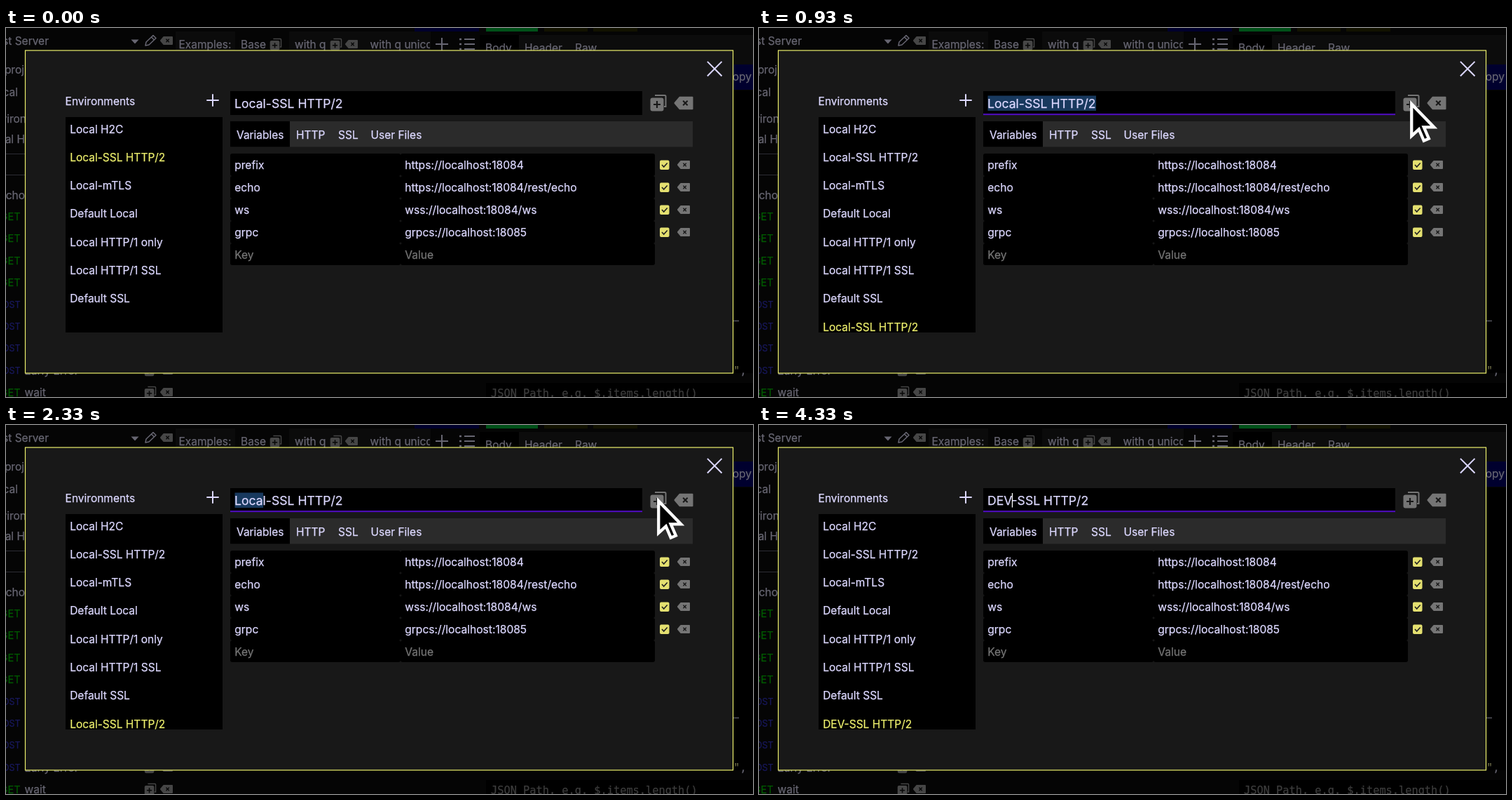
These frames come from a looping animation (1066x526 px, 4390 ms). An HTML page:

```html
<!DOCTYPE html>
<html lang="en">
<head>
<meta charset="utf-8">
<title>Copy environment</title>
<style>
  html, body { margin: 0; width: 100%; height: 100%; overflow: hidden; background: #050505; }
  svg { display: block; width: 1066px; height: 526px; font-family: Inter, "Noto Sans", sans-serif; }
</style>
</head>
<body>
<svg id="stage" viewBox="0 0 1066 526"></svg>
<script>
const LOOP = 4390;
const INK = '#dcd8ff', YELLOW = '#ecee6c', DIM = '#676672', GRAY = '#757575', PANEL = '#181818';
const ICON = '#464646';
const stage = document.getElementById('stage');

// y is the middle of the capitals; the fine stroke gives the slightly heavy rendering
const text = (x, y, s, fill = INK, size = 15.5, attrs = '') =>
  `<text x="${x}" y="${y + size * 0.364}" font-size="${size}" fill="${fill}" stroke="${fill}" stroke-width=".25" ${attrs}>${s}</text>`;
const rect = (x, y, w, h, fill, attrs = '') =>
  `<rect x="${x}" y="${y}" width="${w}" height="${h}" fill="${fill}" ${attrs}/>`;
const line = (d, stroke, width, attrs = '') =>
  `<path d="${d}" fill="none" stroke="${stroke}" stroke-width="${width}" ${attrs}/>`;
const plus = (x, y, r, stroke, width) => line(`M${x - r} ${y}h${2 * r}M${x} ${y - r}v${2 * r}`, stroke, width);
const cross = (x, y, r, stroke, width) =>
  line(`M${x - r} ${y - r}l${2 * r} ${2 * r}M${x + r} ${y - r}l${-2 * r} ${2 * r}`, stroke, width);

function eraseIcon(x, y, w, fill, mark) {
  const h = w * 0.68, r = w / 2;
  return `<path d="M${x - r + 1} ${y}L${x - r * 0.42} ${y - h / 2 + 1}H${x + r - 1}V${y + h / 2 - 1}H${x - r * 0.42}Z"
    fill="${fill}" stroke="${fill}" stroke-width="2" stroke-linejoin="round"/>` +
    cross(x + w * 0.09, y, w * 0.12, mark, w * 0.075);
}

function copyIcon(x, y, k, fill, mark) {
  return `<g transform="translate(${x} ${y}) scale(${k})">` +
    line('M-5 -10.5H9Q10.5 -10.5 10.5 -9V5.5H8', fill, 2) +
    rect(-11.5, -7, 19, 19, fill, 'rx="3"') +
    plus(-2, 2.5, 5, mark, 2.2) + '</g>';
}

const smallCopy = (x, y) => copyIcon(x, y, 0.72, ICON, '#080808');
const smallErase = (x, y) => eraseIcon(x, y, 18, ICON, '#080808');

function backdrop() {
  const end = 'text-anchor="end"';
  const methods = (list, y, fill, size) =>
    list.map((m, i) => text(20.5, y + i * 31.4, m, fill, size, end)).join('');
  return rect(0, 0, 1066, 526, '#050505') +
    rect(242, 5, 85, 27, '#0b0b0b') + rect(404, 5, 202, 27, '#0b0b0b') +
    rect(583, 0, 92, 5, '#00002c') + rect(685, 0, 74, 5, '#005018') +
    rect(768, 0, 62, 5, '#121200') + rect(838, 0, 63, 5, '#121200') +
    rect(676, 10, 390, 42, '#0c0c0c') + rect(676, 10, 56, 42, '#000') +
    rect(1038, 89, 28, 403, '#000') + rect(685, 506, 381, 20, '#000') +
    text(61, 18.5, 'Test Server', DIM, 15.5, end) +
    `<path d="M178.5 16.5h11l-5.5 6z" fill="${DIM}"/>` +
    line('M199 25l1-5L210 10.5l4 4L204 24ZM207.5 13l4 4', DIM, 1.5, 'stroke-linejoin="round"') +
    smallErase(229, 18) +
    text(246.5, 23.5, 'Examples:', DIM) + text(335, 23.5, 'Base', DIM) + smallCopy(385, 23) +
    text(412, 23.5, 'with q', DIM) + smallCopy(471, 23) + smallErase(493, 23) +
    '<clipPath id="tabs"><rect x="510" y="0" width="95" height="40"/></clipPath>' +
    text(519.5, 23.5, 'with q unicode', DIM, 15.5, 'clip-path="url(#tabs)"') +
    plus(622, 23, 9, DIM, 2) +
    line('M654 16h15M654 23h15M654 30h15', DIM, 2) + line('M647 16h3M647 23h3M647 30h3', DIM, 2.5) +
    text(684, 28, 'Body', DIM) + text(740, 28, 'Header', DIM) + text(812, 28, 'Raw', DIM) +
    rect(1030, 52, 36, 36, '#00002e') + text(1064, 69, 'Copy', DIM, 15.5, end) +
    text(26, 59.5, 'proj', DIM, 15.5, end) + text(17, 91, 'Local', DIM, 15.5, end) +
    text(29, 129, 'Environ', DIM, 15.5, end) + text(27, 158, 'Local H', DIM, 15.5, end) +
    line('M0 179.5h30M0 209.5h30', '#2c2c34', 1) +
    text(27, 238, 'echo', DIM, 15.5, end) +
    methods(['GET', 'GET', 'GET', 'GET'], 268.5, '#005800', 14.5) +
    methods(['POST', 'POST', 'POST', 'POST'], 394, '#18185a', 12.5) +
    methods(['GET'], 519.5, '#005800', 14.5) +
    text(26.5, 488, 'Early Error', DIM) + smallCopy(206, 487.5) + smallErase(229, 488) +
    text(26.5, 519.5, 'wait', DIM) + smallCopy(206, 519) + smallErase(229, 519) +
    line('M1038 417.5h8', '#55555f', 1.5) +
    text(1038, 488, '<tspan fill="#777730">"</tspan>,', DIM, 15.5, 'font-family="Noto Sans Mono, monospace"') +
    text(692, 520, 'JSON Path, e.g. $.items.length()', '#3c3c3c', 15.3, 'font-family="DejaVu Sans Mono, monospace"');
}

function variables() {
  const rows = [
    ['prefix', 'https://localhost:18084'],
    ['echo', 'https://localhost:18084/rest/echo'],
    ['ws', 'wss://localhost:18084/ws'],
    ['grpc', 'grpcs://localhost:18085'],
    ['Key', 'Value'],
  ];
  return rows.map(([key, value], i) => {
    const y = 195 + i * 32, last = i === 4, fill = last ? GRAY : INK, h = last ? 31 : 32;
    const cells = rect(320, y - 16, 243, h, '#000', 'rx="3"') + rect(563, y - 16, 363, h, '#000', 'rx="3"') +
      text(326.2, y, key, fill, 15.6) + text(569.2, y, value, fill, 15.6);
    return last ? cells : cells +
      rect(933, y - 6.5, 13.5, 13.5, '#e4e070', 'rx="2"') +
      line(`M936 ${y}l2.7 3l5 -5.5`, '#222', 1.6) +
      eraseIcon(967, y, 18, GRAY, PANEL);
  }).join('');
}

function dialog() {
  const names = ['Local H2C', 'Local-SSL HTTP/2', 'Local-mTLS', 'Default Local',
    'Local HTTP/1 only', 'Local HTTP/1 SSL', 'Default SSL'];
  const tabs = [[329, 'Variables'], [414, 'HTTP'], [474, 'SSL'], [520.5, 'User Files']];
  const item = (s, i) => text(91.2, 144 + i * 40.28, s, INK, 15.5, i === 1 ? 'id="first"' : '');
  return rect(27.5, 32, 1010, 460, PANEL, `stroke="${YELLOW}" stroke-width="1.2"`) +
    cross(1011.2, 58.2, 10.3, INK, 2) +
    text(84.6, 104, 'Environments') + plus(295, 103, 8.7, INK, 2) +
    rect(85, 127, 224, 307, '#000') +
    '<clipPath id="list"><rect x="85" y="127" width="224" height="307"/></clipPath><g clip-path="url(#list)">' +
    names.map(item).join('') + text(91.2, 426, '', YELLOW, 15.5, 'id="copy"') + '</g>' +
    rect(320, 90, 588, 34, '#000') +
    rect(326.5, 96.5, 0, 21.5, '#18395e', 'id="mark"') +
    text(326, 107.2, '', INK, 17.6, 'id="title"') +
    rect(0, 97, 1.3, 20.5, '#fff', 'id="caret"') +
    rect(320, 122, 588, 2.2, '#4a0cb4', 'id="focus"') +
    copyIcon(931, 106.5, 1, GRAY, PANEL) + eraseIcon(967, 107, 27, GRAY, PANEL) +
    rect(320, 133, 660, 36.5, '#2b2b2b') + rect(320, 133, 85, 36.5, '#000') +
    tabs.map(([x, s]) => text(x, 152, s)).join('') +
    variables();
}

const arrow = `<g id="cursor"><path transform="translate(2.25 5.4)"
  d="M0 0V45.5L10.5 36L17.5 52.3L24.6 49.3L17.5 33H32Z"
  fill="#000" stroke="#fff" stroke-width="4.3" stroke-miterlimit="6"/></g>`;

stage.innerHTML = backdrop() + dialog() + arrow;

const $ = id => document.getElementById(id);
const title = $('title'), mark = $('mark'), caret = $('caret'), focus = $('focus');
const first = $('first'), copy = $('copy'), cursor = $('cursor');
const show = (el, on) => el.setAttribute('visibility', on ? 'visible' : 'hidden');

// Editing steps: time, text, selection start and end
const FULL = 'Local-SSL HTTP/2', TAIL = '-SSL HTTP/2';
const CLICK = 900;
const steps = [[0, FULL, 0, 0], [CLICK, FULL, 0, FULL.length], [1530, FULL, 0, 0]];
for (let n = 1; n <= 5; n++) steps.push([1830 + n * 120, FULL, 0, n]);
[2630, 2750, 2900].forEach((at, i) => steps.push([at, 'DEV'.slice(0, i + 1) + TAIL, i + 1, i + 1]));

// Glides in from the top right, rests on the copy button, speeds off upwards
function pointer(t) {
  if (t < 70 || t > 3790) return null;
  const away = Math.max(0, 1 - (t - 70) / 700) ** 4;
  const leave = Math.max(0, (t - 3289) / 441) ** 2;
  return [929 + 217 * away - 18 * leave, 103 - 290 * away - 101 * leave];
}

function draw(t) {
  const [at, value, from, to] = steps.filter(s => s[0] <= t).pop();
  const copied = t >= CLICK;
  const width = n => n ? title.getSubStringLength(0, n) : 0;

  title.textContent = value;
  copy.textContent = copied ? value : '';
  for (const part of ['fill', 'stroke']) first.setAttribute(part, copied ? INK : YELLOW);
  show(focus, copied);

  mark.setAttribute('width', to > from ? width(to) : 0);
  caret.setAttribute('x', 326.3 + width(to));
  show(caret, copied && from === to && (t - at) % 1000 < 500);

  const p = pointer(t);
  show(cursor, p);
  if (p) cursor.setAttribute('transform', `translate(${p[0]} ${p[1]})`);
}

function tick() {
  draw(performance.now() % LOOP);
  requestAnimationFrame(tick);
}
tick();
</script>
</body>
</html>
```
